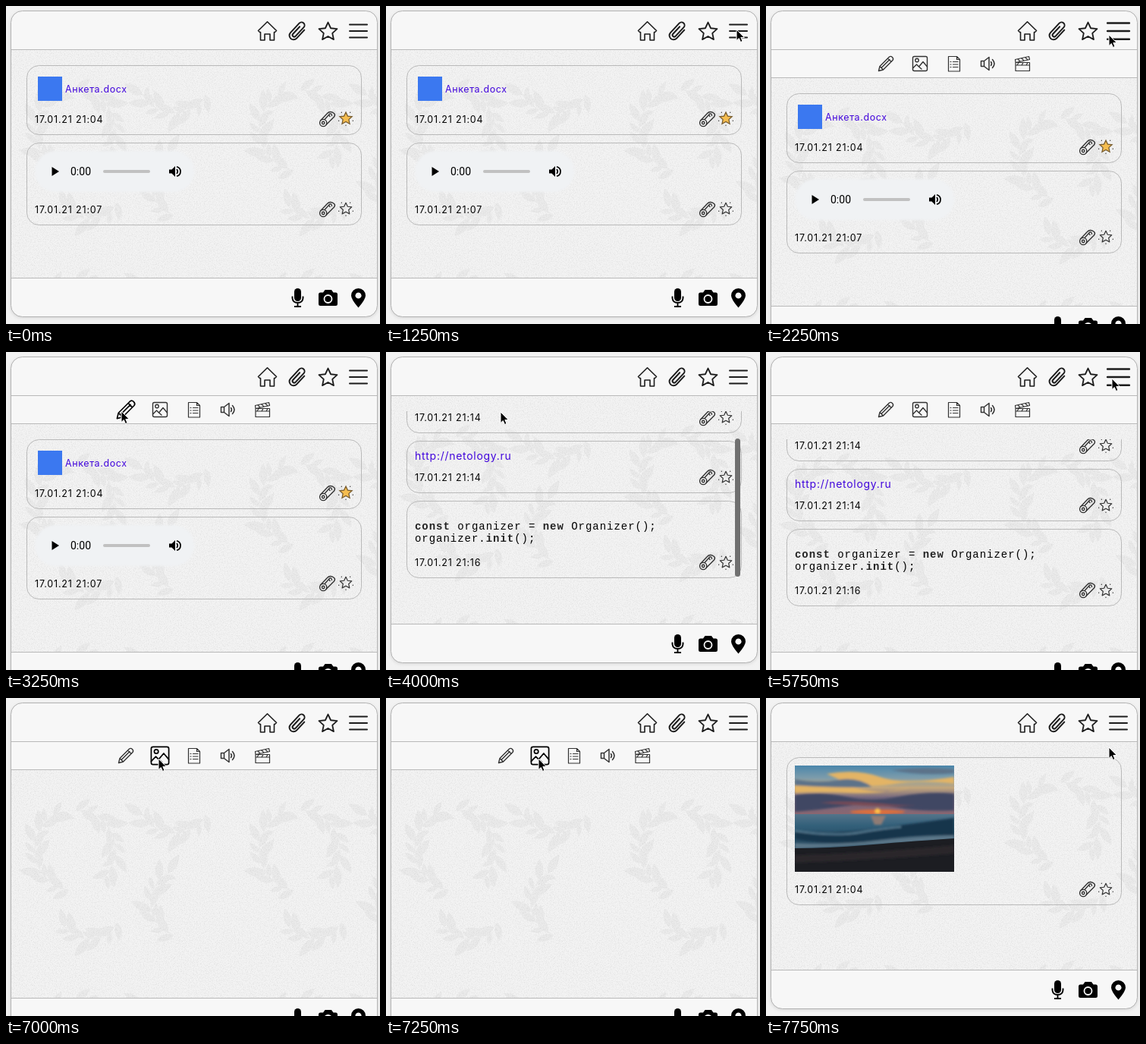
Write an HTML page that moves like this. It is 493 px wide and 419 px high and loops after 8 s.

```html
<!DOCTYPE html>
<html lang="ru">
<head>
<meta charset="utf-8">
<title>Organizer</title>
<style>
html, body { margin: 0; width: 100%; height: 100%; overflow: hidden; background: #f2f2f2; }
svg { display: block; }
text { font-family: Inter, "Open Sans", sans-serif; white-space: pre; }
.date { font-size: 12.5px; letter-spacing: .82px; fill: #000; }
.link { fill: #4206dc; }
.name { letter-spacing: .6px; }
.code { font: 14px "Liberation Mono", monospace; letter-spacing: .97px; }
.code tspan { font-weight: bold; fill: #222; }
.frame { fill: none; stroke: #b9b9b9; }
.line { fill: none; stroke: #1c1c1c; stroke-width: 2; stroke-linejoin: round; stroke-linecap: round; }
.thin { fill: none; stroke: #333; stroke-width: 1.4; stroke-linejoin: round; stroke-linecap: round; }
.hover .thin { stroke: #000; }
</style>
</head>
<body>
<svg width="493" height="419" viewBox="0 0 493 419">
  <defs>
    <pattern id="leaves" width="296" height="250" patternUnits="userSpaceOnUse" y="58"><g id="wreaths" fill="#ebebeb" stroke="#ebebeb"></g></pattern>
    <filter id="grain" x="0" y="0" width="1" height="1" color-interpolation-filters="sRGB">
      <feTurbulence type="fractalNoise" baseFrequency=".8" numOctaves="2" seed="4"/>
      <feColorMatrix values="0 0 0 0 .4  0 0 0 0 .4  0 0 0 0 .4  .3 0 0 0 -.13"/>
    </filter>
    <filter id="soft"><feGaussianBlur stdDeviation="2"/></filter>
    <filter id="haze"><feGaussianBlur stdDeviation="1.6"/></filter>
    <clipPath id="listClip"><path d="M20 78H480V358H20Z"/></clipPath>
    <clipPath id="toolClip"><rect id="toolArea" x="7" y="58" width="482" height="0"/></clipPath>
    <clipPath id="photoClip"><path d="M38 89h210v140H38z"/></clipPath>
    <linearGradient id="sky" x2="0" y2="1">
      <stop stop-color="#4a86ab"/><stop offset=".25" stop-color="#7d9cab"/><stop offset=".45" stop-color="#c2a67c"/>
      <stop offset=".65" stop-color="#75687f"/><stop offset="1" stop-color="#8b6670"/>
    </linearGradient>
    <linearGradient id="sea" x2="0" y2="1">
      <stop stop-color="#54748a"/><stop offset=".3" stop-color="#33607a"/><stop offset="1" stop-color="#1b3a50"/>
    </linearGradient>
    <path id="star" d="M0-9 2.7-3.2 9-2.5 4.3 1.8 5.6 8 0 4.9-5.6 8-4.3 1.8-9-2.5-2.7-3.2Z"/>
    <g id="pin" class="thin">
      <circle cx="-4.8" cy="5" r="4.6"/><circle cx="-4.8" cy="5" r="1.7"/>
      <path d="M-8.500 2 .5-7.500Q2.500-9.800 5-9.500T9.500-7.500 9.500-3L-1 7.500M-3 .5 2-5M4-3.500Q1.500-6.500 4-7T6.500-4.500"/>
    </g>
    <path id="rays" class="thin" d="M-5.700-7.700h.01M5.700-7.700h.01M-9.300 3.200h.01M9.300 3.200h.01M0 9.300h.01"/>
    <g id="plainStar"><use href="#star" class="thin" transform="scale(.86)"/><use href="#rays"/></g>
    <g id="goldStar"><use href="#star" transform="scale(.9)" fill="#f5bd4f" stroke="#775b2d" stroke-width="1.4"/><use href="#rays"/></g>
  </defs>

  <rect width="493" height="419" fill="#f2f2f2"/>
  <rect class="panel" x="6" y="8" width="484" height="403" rx="15" fill="#d6d6d6" filter="url(#soft)"/>
  <rect class="panel" x="6.5" y="6.5" width="483" height="403" rx="15" fill="#f7f7f7" stroke="#b2b2b2"/>

  <g id="body">
    <path d="M7 58H489V358H7Z" fill="#f3f3f3"/>
    <path d="M7 58H489V358H7Z" fill="url(#leaves)"/>
    <rect x="7" y="58" width="482" height="300" filter="url(#grain)"/>
    <path d="M7 57.5H489M7 358.5H489" stroke="#b9b9b9"/>

    <g clip-path="url(#listClip)">
      <g id="files">
        <rect class="frame" x="27.5" y="78.5" width="441" height="91" rx="16"/>
        <path d="M42 93h32v32H42z" fill="#3b78f0"/>
        <text class="date link name" x="78" y="114">Анкета.docx</text>
        <text class="date" x="38" y="154">17.01.21 21:04</text>
        <use href="#pin" x="423" y="149"/><use href="#goldStar" x="448" y="148"/>
        <rect class="frame" x="27.5" y="180.5" width="441" height="108" rx="16"/>
        <rect x="38" y="191" width="210" height="54" rx="27" fill="#f0f2f4" filter="url(#haze)"/>
        <path d="M60.5 212V224L70 218Z"/>
        <text x="85" y="223" style="font:14px Roboto,sans-serif">0:00</text>
        <rect x="128" y="216" width="62" height="4" rx="2" fill="#c1c1c1"/>
        <path d="M215 215.5h3.500l4.500-4.500v14l-4.500-4.500H215z"/>
        <path d="M225 215Q227.500 218 225 221M225 211.700Q230 213 230 218T225 224.300" fill="none" stroke="#000" stroke-width="1.7"/>
        <text class="date" x="38" y="273">17.01.21 21:07</text>
        <use href="#pin" x="423" y="268"/><use href="#plainStar" x="448" y="267"/>
      </g>
      <g id="notes">
        <rect class="frame" x="27.5" y="38.5" width="441" height="68" rx="16"/>
        <text class="date" x="38" y="91">17.01.21 21:14</text>
        <use href="#pin" x="423" y="87"/><use href="#plainStar" x="448" y="86"/>
        <rect class="frame" x="27.5" y="117.5" width="441" height="68" rx="16"/>
        <text class="link" x="38" y="142" font-size="14" letter-spacing=".72">http://netology.ru</text>
        <text class="date" x="38" y="170">17.01.21 21:14</text>
        <use href="#pin" x="423" y="165"/><use href="#plainStar" x="448" y="165"/>
        <rect class="frame" x="27.5" y="196.5" width="441" height="101" rx="16"/>
        <text class="code" x="38" y="234"><tspan>const</tspan> organizer = <tspan>new</tspan> Organizer();</text>
        <text class="code" x="38" y="250">organizer.<tspan>init</tspan>();</text>
        <text class="date" x="38" y="282">17.01.21 21:16</text>
        <use href="#pin" x="423" y="277"/><use href="#plainStar" x="448" y="277"/>
        <rect id="scrollbar" x="460" y="114" width="7" height="182" rx="3.5" fill="#707070"/>
      </g>
      <g id="images">
        <rect class="frame" x="27.5" y="78.5" width="441" height="194" rx="16"/>
        <g clip-path="url(#photoClip)">
          <path d="M38 89h210v65H38z" fill="url(#sky)"/>
          <g filter="url(#haze)">
            <path d="M80 100Q120 93 150 104T248 104V113Q200 108 165 114T100 109ZM38 116Q80 110 120 119T190 118Q150 127 110 125T38 125Z" fill="#e3b465"/>
            <path d="M38 107Q70 113 95 108T140 117Q95 119 38 115ZM165 95Q205 90 248 94V99Q205 103 165 95Z" fill="#5b7289"/>
            <path d="M38 128Q72 123 105 130T175 130 248 126V148Q205 150 170 144T100 143 38 150Z" fill="#3f4663"/>
            <path d="M70 138Q110 135 150 139T215 141Q165 144 130 142Z" fill="#7a4b55"/>
            <ellipse cx="147" cy="150" rx="36" ry="3" fill="#e0703a"/>
            <circle cx="147" cy="149" r="3.5" fill="#ffc04a"/>
          </g>
          <path d="M38 153h210v50H38z" fill="url(#sea)"/>
          <g filter="url(#haze)">
            <path d="M138 155H158L152 167H143Z" fill="#8f7b74"/>
            <path d="M38 174Q85 180 130 174T190 166 248 158V181Q190 180 145 188T38 186Z" fill="#12344c"/>
            <path d="M38 175Q90 183 125 177T178 170" fill="none" stroke="#5d8298" stroke-width="2"/>
            <path d="M38 191Q95 194 145 188T248 181V186Q160 193 38 199Z" fill="#5c7789"/>
          </g>
          <path d="M38 198Q85 198 130 194T248 185V229H38Z" fill="#1c1d22"/>
          <path d="M38 207Q130 205 248 194V205Q130 214 38 217Z" fill="#29282c" filter="url(#haze)"/>
        </g>
        <text class="date" x="38" y="257">17.01.21 21:04</text>
        <use href="#pin" x="423" y="252"/><use href="#plainStar" x="448" y="252"/>
      </g>
    </g>

    <g id="footer">
      <rect x="380" y="372" width="9" height="17" rx="4.5"/>
      <path d="M377.5 382.5V385Q378 391 384.5 391T391.5 385V382.5M384.5 391V396M380 396H389" fill="none" stroke="#000" stroke-width="1.9"/>
      <path d="M414.5 377.5H418L420.5 374H429L431.5 377.5H434.5Q437 377.5 437 380V392.5Q437 395 434.5 395H414.5Q412 395 412 392.5V380Q412 377.5 414.5 377.5Z"/>
      <circle cx="424.5" cy="386" r="5" fill="none" stroke="#f7f7f7" stroke-width="1.8"/>
      <path fill-rule="evenodd" d="M464.5 397.5Q455 386.5 455 381.5A9.5 9.5 0 0 1 474 381.5Q474 386.5 464.5 397.5ZM464.5 377.5a4 4 0 1 0 .01 0Z"/>
    </g>
  </g>

  <path d="M7 57.5H489" stroke="#b9b9b9"/>
  <g class="line">
    <path d="M332.5 32.5 344.5 20.8 356.5 32.5 354.5 34.5H353.5V45H348V37H341V45H335.5V34.5H334.5Z" stroke-width="1.6"/>
    <path transform="translate(384.5 33) rotate(43)" d="M5.5-7V8A5.500 5.500 0 0 1-5.500 8V-9A4 4 0 0 1 2.500-9V7A2.200 2.200 0 0 1-2 7V-6"/>
    <use href="#star" transform="translate(424.5 33.5) scale(1.33)" stroke-width="1.4"/>
  </g>
  <g transform="translate(464.5 33)"><g id="menu"><path class="line" d="M-11.5-8.5H11.5M-11.5 0H11.5M-11.5 8.5H11.5"/></g></g>

  <g clip-path="url(#toolClip)">
    <g id="tools">
      <g transform="translate(158 76)"><g id="pencil">
        <path class="thin" d="M-9.5 9.5-8 3.500 4.500-9Q6.500-10.500 8.500-8.500T9-4.500L-3.500 8ZM-8 3.500-3.500 8M2.500-7 7-2.500M-5.500 5 5-5.500"/>
      </g></g>
      <g transform="translate(203 76)"><g id="picture">
        <rect class="thin" x="-9.5" y="-9.5" width="19" height="19" rx="2"/>
        <circle class="thin" cx="-4" cy="-4.5" r="2.2"/>
        <path class="thin" d="M-9.5 6-4.500 1-1.500 4 4-2.500 9.500 4M-1.500 4 2 7"/>
      </g></g>
      <g class="thin" style="stroke-width:1.2">
        <path d="M240.5 66.5H251.5L255.5 70.5V86H240.5ZM251.5 66.5V70.5H255.5M246.5 73.5H253M246.5 77H253M246.5 80.5H253M243 73.5h1M243 77h1M243 80.5h1"/>
        <path d="M283.5 72.5H287.5L294 67.5V84.5L287.5 79.5H283.5ZM287.5 72.5V79.5M296.5 73.5Q298.5 76 296.5 78.5M298.5 70.5Q303.5 76 298.5 81.5" style="stroke-width:1.5"/>
        <path d="M329 74.5H347.5V85.5H329ZM329 78H347.5M329 74.5 328.5 70.5 346.5 66.5 347.5 70.5ZM332 70 335 73M337 69 340 72M342 68 345 71M333 74.5 331 78M339 74.5 337 78M345 74.5 343 78"/>
      </g>
    </g>
    <path id="toolEdge" d="M7 57.5H489" stroke="#b9b9b9"/>
  </g>

  <path id="cursor" d="M0 0V14.5L3.300 11.500 5.500 16.500 8 15.400 5.800 10.500H10.300Z" stroke="#fff"/>
</svg>
<script>
const $ = id => document.getElementById(id);
const STEP = 250, STEPS = 32, TOOLBAR = 37;

// A curved twig with alternating leaves, angles in degrees
function twig(cx, cy, r, from, sweep) {
  const point = deg => [cx + r * Math.cos(deg * Math.PI / 180), cy + r * Math.sin(deg * Math.PI / 180)];
  const count = Math.round(r * sweep / 420);
  let out = `<path fill="none" d="M${point(from)}A${r} ${r} 0 0 1 ${point(from + sweep)}"/>`;
  for (let i = 0; i <= count; i++) {
    const deg = from + sweep * i / count, [x, y] = point(deg);
    const turn = deg + 90 + (i % 2 ? 38 : -38) + 12 * Math.sin(i * 5);
    const size = 1.1 + .3 * Math.sin(i * 2.3);
    out += `<path stroke="none" d="M0 0Q9-9 22 0Q9 8 0 0Z" transform="translate(${x} ${y}) rotate(${turn}) scale(${size})"/>`;
  }
  return out;
}
$('wreaths').innerHTML = twig(92, 105, 54, 100, 145) + twig(92, 105, 52, 270, 130) +
  twig(222, 35, 48, 30, 120) + twig(236, 175, 45, 110, 130) + twig(110, 180, 42, 30, 110);

// step, x, y of the pointer tip
const path = [[2, 483, 18], [5, 462, 31], [6, 462, 31], [9, 452, 38], [10, 452, 38], [12, 250, 86], [13, 152, 78],
  [17, 151, 79], [18, 160, 74], [21, 456, 35], [23, 456, 35], [24, 453, 38], [27, 201, 80], [29, 201, 80], [31, 452, 65]];
function pointerAt(step) {
  const i = Math.max(1, path.findIndex(p => p[0] >= step));
  const [a, b] = [path[i - 1], path[i]], k = (step - a[0]) / (b[0] - a[0]);
  return [1, 2].map(n => Math.round(a[n] + (b[n] - a[n]) * k));
}

const between = (step, a, b) => step >= a && step <= b;
const show = (id, on) => $(id).style.display = on ? '' : 'none';
function hover(id, on, scale) {
  $(id).setAttribute('transform', `scale(${on ? scale : 1})`);
  $(id).classList.toggle('hover', on);
}

function draw(step) {
  const opening = step === 8 || step === 22;
  const open = between(step, 9, 15) || between(step, 23, 29);
  const drop = open ? TOOLBAR : opening ? 19 : 0;

  $('body').setAttribute('transform', `translate(0 ${drop})`);
  $('tools').setAttribute('transform', `translate(0 ${drop - TOOLBAR})`);
  $('toolEdge').setAttribute('transform', `translate(0 ${drop})`);
  $('toolArea').setAttribute('height', drop);
  document.querySelectorAll('.panel').forEach(p => p.setAttribute('height', 403 + drop));

  show('files', step < 15);
  show('notes', between(step, 16, 27));
  show('images', step >= 30);
  show('scrollbar', between(step, 16, 18));

  hover('menu', between(step, 7, 10) || between(step, 21, 24), 1.25);
  hover('pencil', between(step, 13, 15), 1.22);
  hover('picture', between(step, 27, 29), 1.22);

  show('cursor', step >= 2);
  if (step >= 2) $('cursor').setAttribute('transform', `translate(${pointerAt(step)})`);
}

const start = performance.now();
let last = -1;
function tick() {
  const step = Math.floor((performance.now() - start) / STEP) % STEPS;
  if (step !== last) draw(last = step);
  requestAnimationFrame(tick);
}
tick();
</script>
</body>
</html>
```
